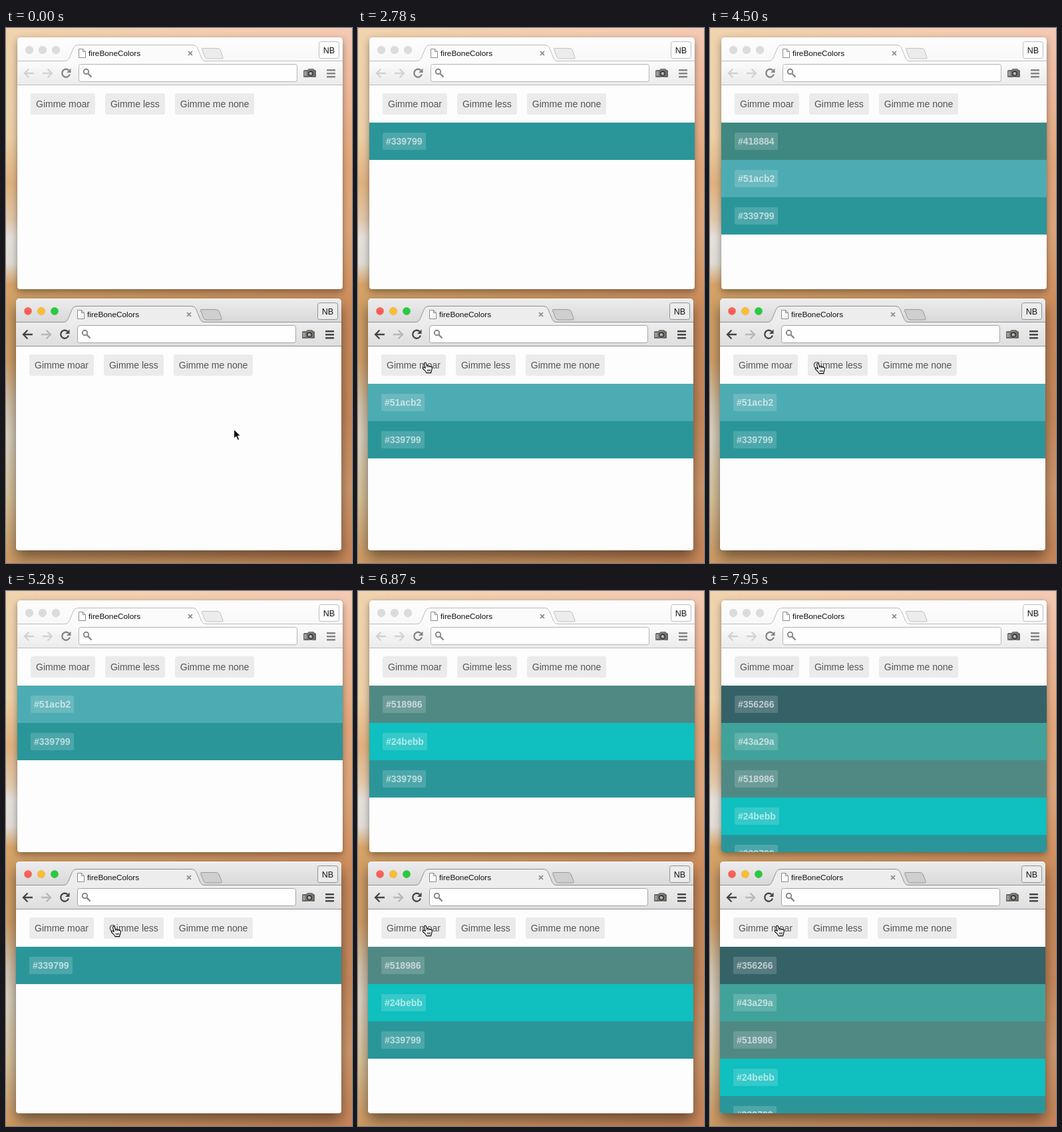
An HTML page for the animation above (8 s loop, 520 by 803 pixels).

```html
<!DOCTYPE html>
<html lang="en">
<head>
<meta charset="utf-8">
<title>fireBoneColors</title>
<style>
html, body { margin: 0; width: 100%; height: 100%; overflow: hidden; }
body { position: relative; font: 14px "Liberation Sans", Arial, sans-serif; color: #555; }
.wall { position: absolute; inset: 0; }
.wall.left { background: linear-gradient(#f0d3ae, #ecd0a8 20%, #dfb280 29%, #e2c9ad 36%, #e4e0dc 39%, #e0dcd6 44%, #d6a367 48%, #d5a46a 62%, #d9c8ae 70%, #e2d9c8 76%, #dfc8a0 88%, #cf9a62); }
.wall.right { background: linear-gradient(#f4cab5, #eeb99a 12%, #e2a679 26%, #dda57b 38%, #d0905f 50%, #cc8b5c 72%, #d49b70 86%, #c98658);
  -webkit-mask-image: linear-gradient(90deg, transparent, #000); mask-image: linear-gradient(90deg, transparent, #000); }
.window { position: absolute; width: 489px; height: 378px; border-radius: 5px 5px 4px 4px; overflow: hidden; background: #fdfdfd; }
.window.idle { left: 17px; top: 14px; box-shadow: 0 0 1px rgba(0,0,0,.4), 0 4px 11px rgba(0,0,0,.38); }
.window.active { left: 15px; top: 406px; box-shadow: 0 0 1px rgba(0,0,0,.5), 0 10px 21px rgba(0,0,0,.5); }
.window > svg { display: block; width: 489px; height: 72px; }
.buttons { display: flex; gap: 15px; height: 32px; padding: 12px 20px; }
.buttons span { padding: 0 8px; line-height: 32px; border-radius: 3px; background: #ebebeb; white-space: pre; }
.row { height: 56px; box-sizing: border-box; padding: 15px 20px; }
.row b { display: inline-block; height: 26px; line-height: 26px; padding: 0 5px; border-radius: 2px; background: rgba(255,255,255,.16); color: rgba(255,255,255,.62); vertical-align: top; }
#cursor { position: absolute; left: 0; top: 0; width: 20px; height: 22px; overflow: visible; }
</style>
</head>
<body>
<div class="wall left"></div>
<div class="wall right"></div>
<script>
const LOOP = 8000;

// Colours as they appear on screen for each label
const SHADES = {
  '339799': '#2b969a', '51acb2': '#4dacb3', '418884': '#3f8882', '24bebb': '#10bfbf',
  '518986': '#508984', '43a29a': '#40a29b', '356266': '#346267'
};

// [time in the front window, time in the back window, colour to add, or null to remove]
const EVENTS = [
  [1590, 1760, '339799'], [2660, 2840, '51acb2'], [3430, 3610, '418884'],
  [4500, 4680, null], [5280, 5390, null],
  [6220, 6400, '24bebb'], [6700, 6870, '518986'], [7230, 7410, '43a29a'], [7770, 7950, '356266']
];

// Pointer moves: first and last step time, number of steps, destination
const MOVES = [
  [420, 1180, 14, 109, 497], [1240, 1350, 3, 101, 502],
  [4030, 4320, 6, 162, 503], [5570, 5930, 7, 101, 502]
];
const HOME = [342, 602];
const BUTTON_SPANS = [[35, 132], [147, 237], [252, 371]];

const IDLE = {
  name: 'idle', lights: ['#dcdcdc', '#dcdcdc', '#dcdcdc'], rim: '#cfcfcf',
  bar: ['#fdfdfd', '#f8f8f8'], tool: ['#fbfbfb', '#ebebeb'], line: '#bdbdbd', newTab: '#ececec',
  back: '#d2d2d2', forward: '#d2d2d2', icon: '#848484', badge: '#fefefe', field: '#b4b4b4'
};
const ACTIVE = {
  name: 'active', lights: ['#ff5f57', '#ffbd2e', '#28ca41'], rim: 'rgba(0,0,0,.15)',
  bar: ['#ededed', '#d8d8d8'], tool: ['#ededed', '#dedede'], line: '#929292', newTab: '#cfcfcf',
  back: '#454545', forward: '#b8b8b8', icon: '#454545', badge: '#ececec', field: '#a3a3a3'
};

const gradient = (id, [from, to]) =>
  `<linearGradient id="${id}" x2="0" y2="1"><stop stop-color="${from}"/><stop offset="1" stop-color="${to}"/></linearGradient>`;

function chrome(s) {
  const lights = s.lights.map((c, i) =>
    `<circle cx="${18 + 20 * i}" cy="19" r="5.7" fill="${c}" stroke="${s.rim}" stroke-width=".6"/>`).join('');
  const menu = [48, 53, 58].map(y => `<rect x="465" y="${y}" width="13" height="2.4" rx=".5" fill="${s.icon}"/>`).join('');
  return `<svg viewBox="0 0 489 72" fill="none">
    <defs>${gradient(s.name + 'Bar', s.bar)}${gradient(s.name + 'Tool', s.tool)}</defs>
    <path fill="url(#${s.name}Bar)" d="M0 0H489V36H0z"/>
    <path fill="url(#${s.name}Tool)" d="M0 36H489V72H0z"/>
    <path stroke="#fff" stroke-opacity=".7" d="M0 .5H489"/>
    ${lights}
    <path fill="${s.newTab}" stroke="${s.line}" stroke-width=".9" d="M277.5 18Q277 16.5 279 16.5H300Q304 16.5 305 19L309 29.5Q310 32 307 32H287Q283 32 282 29.5z"/>
    <path fill="${s.tool[0]}" stroke="${s.line}" d="M-2 35.5H72Q76 35.5 78 31.5L84.500 15.500Q86.500 11.500 91 11.500H264Q268.500 11.500 270.500 15.500L277 31.500Q279 35.500 283 35.500H491V38H-2z"/>
    <path fill="${s.tool[0]}" d="M0 36H489V39H0z"/>
    <rect x="453.500" y="6.500" width="30" height="25" rx="3" fill="${s.badge}" stroke="${s.line}"/>
    <text x="468.500" y="24" font-size="12.500" fill="#111" text-anchor="middle">NB</text>
    <path fill="#fff" stroke="#8b8b8b" d="M92.500 17.500h6l4 4v9h-10zM98.500 17.500v4h4"/>
    <text x="107" y="28" font-size="11.800" fill="#111">fireBoneColors</text>
    <path stroke="#858585" stroke-width="1.700" d="M257 21l6 6m0-6l-6 6"/>
    <path stroke="${s.back}" stroke-width="2.300" d="M25 54H12M17.500 47.500L11 54L17.500 60.500"/>
    <path stroke="${s.forward}" stroke-width="2.300" d="M38 54H51M45.500 47.500L52 54L45.500 60.500"/>
    <path stroke="${s.icon}" stroke-width="2.300" d="M77.500 49.500A6 6 0 1 0 79 55.500"/>
    <path fill="${s.icon}" d="M80.500 46.500V53H74z"/>
    <rect x="92.500" y="40.500" width="328" height="26" rx="3" fill="#fefefe" stroke="${s.field}"/>
    <circle cx="103.500" cy="51.500" r="3.700" stroke="#858585" stroke-width="1.900"/>
    <path stroke="#858585" stroke-width="2.400" d="M106.500 54.500l5 5"/>
    <rect x="430" y="49" width="19" height="11" rx="1.500" fill="#666"/>
    <path fill="#777" d="M436 49l2-2h7l2 2z"/>
    <path fill="#999" d="M431 51h4v7h-4z"/>
    <circle cx="441" cy="54.500" r="5" fill="#383838" stroke="#aaa" stroke-width=".8"/>
    <circle cx="441" cy="54.500" r="2.500" fill="#9aa58a"/>
    <circle cx="440.300" cy="53.700" r="1" fill="#e2dfc8"/>
    ${menu}
    <path stroke="${s.line}" d="M0 71.500H489"/>
  </svg>`;
}

function addWindow(style) {
  const el = document.createElement('div');
  el.className = `window ${style.name}`;
  el.innerHTML = chrome(style) +
    '<div class="buttons"><span>Gimme moar</span><span>Gimme less</span><span>Gimme me none</span></div><div class="rows"></div>';
  document.body.append(el);
  return { rows: el.querySelector('.rows'), shown: '' };
}

const front = 0, back = 1;
const backWindow = addWindow(IDLE), frontWindow = addWindow(ACTIVE);

document.body.insertAdjacentHTML('beforeend', `<svg id="cursor">
  <path id="arrow" fill="#000" stroke="#fff" stroke-width="1.200" d="M.5 0V14.500L3.900 11.400L6.200 16.800L8.800 15.700L6.500 10.400H11z"/>
  <g id="hand" transform="translate(-5 -1)" stroke="#000" stroke-width="1.100" stroke-linejoin="round">
    <path fill="#fff" d="M5.300 9.500L3.800 3.600C3.200 .9 5.700 .3 6.400 2.500L7.600 6.300C9 5.300 10 5.800 10.400 6.700C11.700 5.900 12.700 6.600 12.900 7.500C14.500 7 15.300 8 15.300 9.200C15.300 12.200 13.900 13.300 13.600 16.600H7C6 13.600 3 12.200 1.500 9.900C.5 8.200 2.600 7.400 3.900 8.500z"/>
    <path fill="none" stroke-width=".9" d="M8.200 11.500l.6 3M10.200 11.300l.3 3M12.100 11.200v3M7.600 6.300l.7 2.200M10.400 6.700l.4 1.900"/>
  </g></svg>`);
const [cursor, arrow, hand] = ['cursor', 'arrow', 'hand'].map(id => document.getElementById(id));

function showRows(win, which, t) {
  const stack = [];
  for (const event of EVENTS) {
    if (t < event[which]) break;
    if (event[2]) stack.unshift(event[2]); else stack.shift();
  }
  const key = stack.join();
  if (key === win.shown) return;
  win.shown = key;
  win.rows.innerHTML = stack.map(c => `<div class="row" style="background:${SHADES[c]}"><b>#${c}</b></div>`).join('');
}

const ease = p => p * p * (3 - 2 * p);

function pointerAt(t) {
  let [x, y] = HOME;
  for (const [start, end, steps, toX, toY] of MOVES) {
    if (t < start) break;
    const step = Math.floor((t - start) / (end - start) * (steps - 1)) + 1;
    const p = ease(Math.min(1, step / steps));
    x += (toX - x) * p;
    y += (toY - y) * p;
  }
  return [Math.round(x), Math.round(y)];
}

function draw(now) {
  const t = now % LOOP;
  showRows(frontWindow, front, t);
  showRows(backWindow, back, t);
  const [x, y] = pointerAt(t);
  const overButton = y >= 490 && y < 522 && BUTTON_SPANS.some(([a, b]) => x >= a && x < b);
  cursor.style.transform = `translate(${x}px, ${y}px)`;
  hand.style.display = overButton ? '' : 'none';
  arrow.style.display = overButton ? 'none' : '';
}

const began = performance.now();
function frame() {
  draw(performance.now() - began);
  requestAnimationFrame(frame);
}
frame();
</script>
</body>
</html>
```
